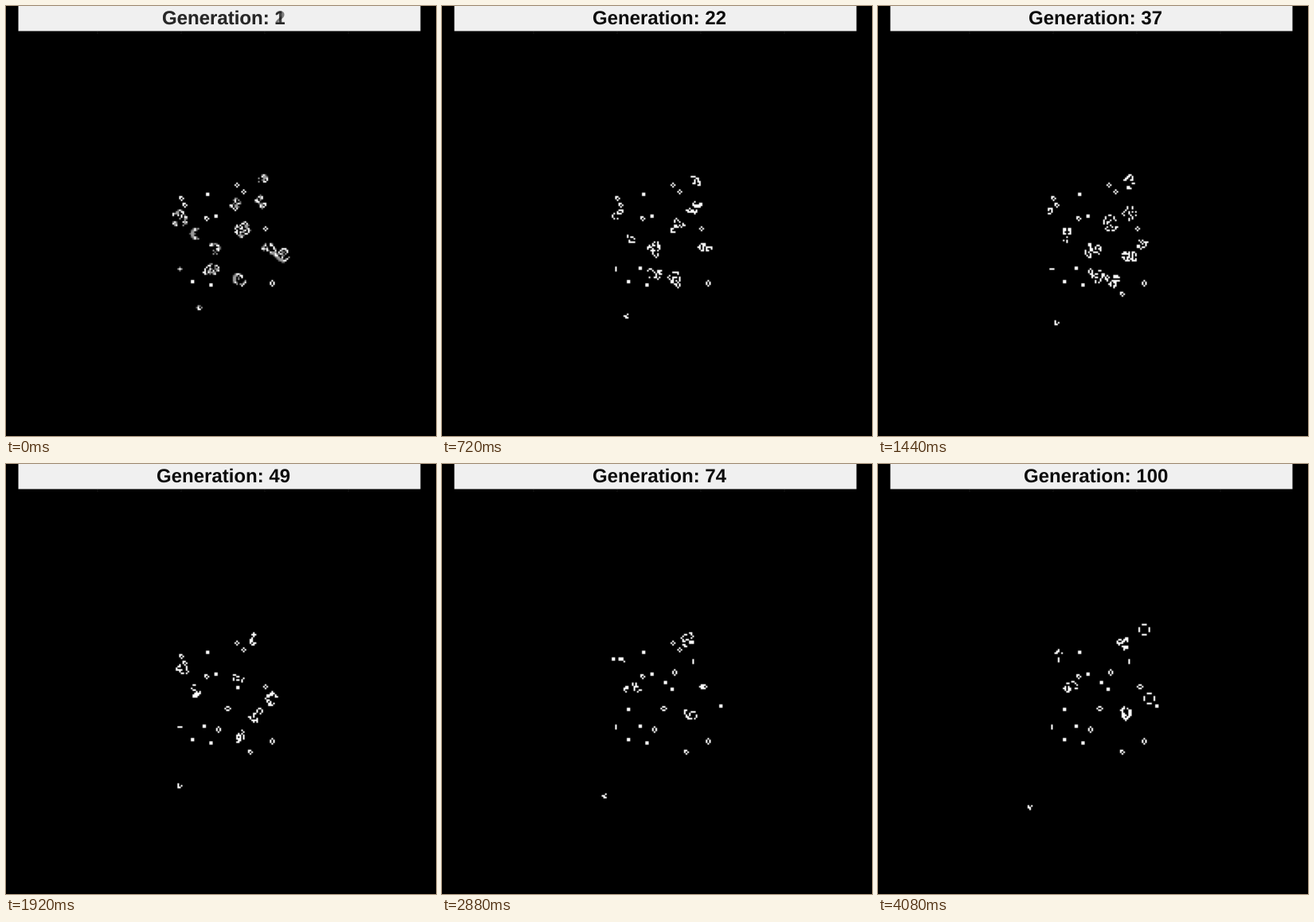
A matplotlib script for the animation above (4.16 s loop, 540 by 540 pixels).

```python
import numpy as np
import matplotlib.pyplot as plt
from matplotlib.animation import FuncAnimation
from matplotlib.patches import Rectangle

SIZE, DPI = 540, 100
FRAMES, INTERVAL = 52, 80
LEFT, TOP, SIDE = 15, 32, 506
CELLS = 240
PITCH = SIDE / CELLS
LAST = 100
STIR = 9  # generations between fresh stirs of a busy region

# Frame index -> generation shown; the counter rests once at 37
CLOCK = [0, 5, 13, 18, 19, 29, 43, 51]
GENS = [1.4, 14.4, 30, 37, 37, 61, 87, 100]

SHAPES = {
    "block": "oo/oo",
    "boat": "oo./o.o/.o.",
    "tub": ".o./o.o/.o.",
    "hive": ".o./o.o/o.o/.o.",
    "wide": ".oo./o..o/.oo.",
    "blinker": ".../ooo/...",
    "glider": "o../o.o/oo.",
}


def shape(name):
    rows = SHAPES[name].split("/")
    return np.pad([[c == "o" for c in row] for row in rows], 1)


def light():
    """Four blinkers around a centre, pointing outwards."""
    arm = np.zeros((11, 11), bool)
    arm[5, 1:4] = True
    return arm | arm[:, ::-1] | arm.T | arm.T[::-1]


def step(a):
    n = sum(np.roll(a, (i, j), (0, 1)).astype(int)
            for i in (-1, 0, 1) for j in (-1, 0, 1))
    return (n == 3) | (a & (n == 4))


def stamp(grid, part, x, y):
    """Merge a pattern into the grid, centred on pixel (x, y)."""
    h, w = part.shape
    c = int(round((x - LEFT) / PITCH - w / 2))
    r = int(round((y - TOP) / PITCH - h / 2))
    grid[r:r + h, c:c + w] |= part


world = np.zeros((LAST + 2, CELLS, CELLS), bool)


def settle(part, *spots, first=1, last=LAST + 1):
    """Still lifes and oscillators, which lie flat on odd generations."""
    phases = step(part), part
    for g in range(first, last + 1):
        for x, y in spots:
            stamp(world[g], phases[g % 2], x, y)


def brew(rng, w, h):
    """Life history of a random patch held inside an ellipse."""
    yy, xx = np.mgrid[:h + 4, :w + 4]
    dy, dx = yy - (h + 3) / 2, xx - (w + 3) / 2
    inner = (2 * dx / w) ** 2 + (2 * dy / h) ** 2 <= 1.1
    outer = (dx / (w / 2 + 1)) ** 2 + (dy / (h / 2 + 1)) ** 2 <= 1
    for _ in range(40):
        a = inner & (rng.random(inner.shape) < 0.42)
        run = []
        for _ in range(STIR + 2):
            a = step(a) & outer
            run.append(a)
        if min(s.sum() for s in run) >= 0.2 * w * h:
            break
    return run[2:]


def soup(start, end, first=1, last=LAST):
    """A restless region drifting from one point to another."""
    rng = np.random.default_rng(start)
    for g in range(first, last + 1, STIR):
        x, y = np.interp(g, [first, last], np.array([start, end]).T[0]), \
            np.interp(g, [first, last], np.array([start, end]).T[1])
        w, h = rng.integers(6, 10, 2)
        for k, a in enumerate(brew(rng, w, h)):
            if g + k < len(world):
                stamp(world[g + k], a, x, y)


# Debris that lasts, fades early or appears later
settle(shape("block"), (254, 237), (263, 264.5), (233.5, 346), (258, 350))
settle(shape("boat"), (253, 267))
settle(shape("hive"), (333.5, 349))
settle(shape("blinker"), (217.5, 330))

settle(shape("boat"), (220, 242), (225.5, 250.5), last=60)
settle(shape("tub"), (290, 225), (298.5, 234), (325, 279), last=75)

settle(shape("block"), (249.5, 330), first=10)
settle(shape("hive"), (267, 334), first=34)
settle(shape("wide"), (278, 307), first=38)
settle(shape("boat"), (306, 362), first=26)

settle(shape("block"), (234, 308), (350, 304), first=55)
settle(shape("blinker"), (315, 249), first=55)
settle(shape("block"), (280, 275), (288.5, 283.5), first=70)
settle(shape("hive"), (293, 261), first=70)
settle(shape("wide"), (329, 280), first=70)
settle(light(), (334, 209), (340.5, 295), first=78)

# Regions still boiling, some to the end and some dying out
soup((322, 218), (307, 224))
soup((219, 268), (225, 240))
soup((239, 288), (241, 281))
soup((318, 314), (310, 312), first=28)
soup((297, 279), (289, 269), last=61)
soup((293, 343), (297, 344), last=61)
soup((330, 308), (333, 291), last=61)
soup((320, 247), (316, 260), last=37)
soup((262, 303), (268, 306), last=37)
soup((258, 331), (276, 341), last=37)
soup((286, 248), (292, 254), last=14)
soup((348, 314), (350, 312), last=14)

# The escaping glider
glider = np.zeros((CELLS, CELLS), bool)
stamp(glider, shape("glider"), 243.7, 378.8)
for g in range(1, LAST + 2):
    world[g] |= glider
    glider = step(glider)

plt.rcParams["toolbar"] = "None"
plt.rcParams["text.hinting"] = "none"
fig = plt.figure(figsize=(SIZE / DPI, SIZE / DPI), dpi=DPI, facecolor="black")
ax = fig.add_axes([0, 0, 1, 1])
ax.axis("off")
board = ax.imshow(world[1].astype(float), cmap="gray", vmin=0, vmax=1,
                  extent=(LEFT, LEFT + SIDE, TOP + SIDE, TOP),
                  aspect="auto", interpolation="hanning")
ax.set(xlim=(0, SIZE), ylim=(SIZE, 0))
ax.add_patch(Rectangle((LEFT + 0.5, -1), SIDE - 1, TOP + 0.5,
                       fc="#f0f0f0", lw=0, snap=False))
for x in range(115, SIZE - 100, 105):
    ax.add_patch(Rectangle((x - 1, TOP), 2, 3, fc="#0c0c0c", lw=0))

style = dict(family="Liberation Sans", weight="bold", color="#0c0c0c",
             fontsize=24 * 72 / DPI, ha="center", va="baseline")
title = ax.text(273.5, 23, "", **style)
ghost = ax.text(273.5, 23, "", **style)


def draw(i):
    gen = float(np.interp(i, CLOCK, GENS))
    low = int(gen)
    mix = gen - low
    # halfway between two generations, both show through
    blend = 0.3 < mix < 0.7
    if not blend:
        low, mix = int(round(gen)), 0
    board.set_data((1 - mix) * world[low] + mix * world[low + 1])
    title.set(text=f"Generation: {low}", alpha=0.75 if blend else 1)
    ghost.set(text=f"Generation: {low + 1}", alpha=0.5 if blend else 0)
    return board, title, ghost


anim = FuncAnimation(fig, draw, frames=FRAMES, interval=INTERVAL,
                     repeat=True, repeat_delay=0)
plt.show()
```
